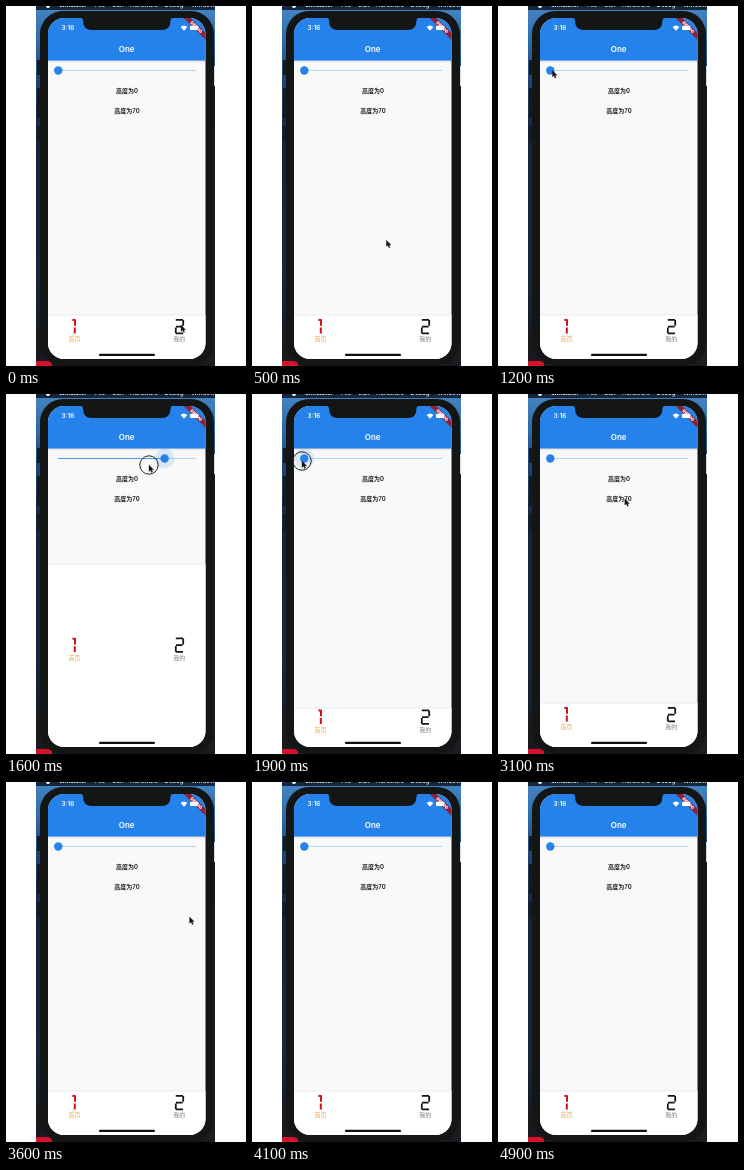
Recreate the animation shown at these times as an HTML page. Size 240x360 px, loop 5000 ms.

```html
<!DOCTYPE html>
<html lang="zh">
<head>
<meta charset="utf-8">
<style>
html, body { margin: 0; width: 100%; height: 100%; overflow: hidden; background: #fff; }
svg { display: block; width: 240px; height: 360px; }
text { font-family: Inter, "Noto Sans CJK SC", "Noto Sans CJK", sans-serif; text-anchor: middle; }
</style>
</head>
<body>
<svg viewBox="0 0 240 360">
  <defs>
    <linearGradient id="desk" x2="0" y2="1">
      <stop offset="0" stop-color="#4585c4"/>
      <stop offset=".1" stop-color="#2f6aa8"/>
      <stop offset=".2" stop-color="#1d4674"/>
      <stop offset=".36" stop-color="#13253c"/>
      <stop offset=".75" stop-color="#14283e"/>
      <stop offset=".92" stop-color="#181a20"/>
    </linearGradient>
    <linearGradient id="shade" x2="0" y2="1">
      <stop offset="0" stop-color="#000" stop-opacity=".14"/>
      <stop offset="1" stop-color="#000" stop-opacity="0"/>
    </linearGradient>
    <clipPath id="view"><path d="M30 0H209V360H30z"/></clipPath>
    <clipPath id="screen"><rect x="42" y="12" width="157.5" height="341" rx="16"/></clipPath>
  </defs>
  <g clip-path="url(#view)">
    <rect x="30" width="179" height="360" fill="url(#desk)"/>
    <path d="M202 60H209V81H202z" fill="#d3dbe2"/>
    <path d="M202 81H209V360H202z" fill="#1b1d20"/>
    <path d="M30 355H46V360H30z" fill="#d5122c"/>
    <path d="M30 0H209V4H30z" fill="#16263c"/>
    <g fill="#fff" font-size="6" font-weight="500">
      <circle cx="42" cy="0" r="2"/>
      <text x="67" y="1.4" font-weight="700">Simulator</text>
      <text x="94" y="1.4">File</text>
      <text x="112" y="1.4">Edit</text>
      <text x="138" y="1.4">Hardware</text>
      <text x="168" y="1.4">Debug</text>
      <text x="197" y="1.4">Window</text>
    </g>
    <path d="M31 54H36V69H31zM31 82H36V112H31zM31 120H36V136H31zM205 80H209V124H205z" fill="#17191c"/>
    <rect x="34" y="5" width="174" height="355" rx="23" fill="#141616"/>

    <g clip-path="url(#screen)">
      <path d="M42 12H200V353H42z" fill="#f9f9f9"/>
      <path d="M42 54H200V57H42z" fill="url(#shade)"/>
      <path d="M42 12H200V54.5H42z" fill="#2482ea"/>
      <text x="62" y="24.3" font-size="6.4" font-weight="600" fill="#fff">3:16</text>
      <text x="120.7" y="45.7" font-size="8" font-weight="600" fill="#fff">One</text>
      <path d="M74.5 12Q77 12 77 14.5Q77 24 86 24H155.5Q164.5 24 164.5 14.5Q164.5 12 167 12z" fill="#141616"/>

      <path d="M52 64.5H190" stroke="#b3d3f5" stroke-width="1"/>
      <path id="track" stroke="#4a97ed" stroke-width="1"/>
      <circle id="halo" cy="64.5" r="10" fill="#2482ea" opacity=".15"/>
      <circle id="thumb" cy="64.5" r="4.2" fill="#2482ea"/>
      <g font-size="6" font-weight="600" fill="#1c1c1c">
        <text x="121" y="87">高度为0</text>
        <text x="121" y="107">高度为70</text>
      </g>

      <g id="bar">
        <path d="M42 0H200V360H42z" fill="#fff"/>
        <path d="M42 0H200" stroke="#e6e6e6" stroke-width=".8"/>
      </g>
      <g id="items" font-size="6" font-weight="500">
        <path d="M66.4 -11.2L69 -10.8V-5.2M68.8 -3.4V2.4" fill="none" stroke="#d01414" stroke-width="2"/>
        <path d="M169.8 -11.2H177M177.2 -11V-5.2M170 -4.4H176.6M169.8 -3.6V2.2M169.8 2.3H177" fill="none" stroke="#161616" stroke-width="1.8"/>
        <text x="68.5" y="10" fill="#f2a340">首页</text>
        <text x="173.3" y="10" fill="#7d7d7d">我的</text>
      </g>
      <rect x="93" y="347.8" width="56" height="2.1" rx="1" fill="#111"/>
      <g transform="translate(190.3 21.2) rotate(45)">
        <path d="M-24 -2.4H24V2.4H-24z" fill="#8f2038"/>
        <text y="1.5" font-size="4.3" font-weight="900" fill="#fff">DEBUG</text>
      </g>
      <path d="M174.6 21Q178 18 181.4 21L178 24.8z" fill="#fff"/>
      <rect x="184" y="19.7" width="8.4" height="4.4" rx="1.2" fill="#fff"/>
    </g>
    <g id="cursor">
      <circle id="ring" r="9.2" fill="none" stroke="#222" stroke-width="1"/>
      <path d="M0 0V6.4L1.5 5.1L2.6 7.6L3.7 7.1L2.6 4.7H4.6z" fill="#111" stroke="#111" stroke-width=".3"/>
    </g>
  </g>
</svg>
<script>
const $ = id => document.getElementById(id);
const LOOP = 5000, STEP = 100;

// Keys are [time, value, ...]; values are interpolated linearly.
function at(keys, t) {
  const i = keys.findIndex(k => k[0] > t);
  if (i < 0) return keys[keys.length - 1].slice(1);
  if (i === 0) return keys[0].slice(1);
  const a = keys[i - 1], b = keys[i], p = (t - a[0]) / (b[0] - a[0]);
  return a.slice(1).map((v, n) => v + (b[n + 1] - v) * p);
}

const slide = [[1200, 0], [1300, .3], [1400, .7], [1500, .9], [1600, .773], [1700, .45], [1800, .15], [1900, 0]];
const pointer = [
  [0, 175, 319], [300, 174, 317], [800, 75, 110], [1100, 54.5, 64.5], [1200, 54.5, 64.5],
  [1300, 100, 67], [1400, 155, 69], [1500, 172, 70], [1600, 143, 71], [1700, 100, 70],
  [1800, 62, 68], [1900, 50, 67], [2000, 56, 69], [2400, 126.8, 92.7], [2700, 126.8, 104.7],
  [3200, 126.8, 104.7], [3800, 212, 150]
];

function draw(now) {
  const t = Math.floor(now % LOOP / STEP) * STEP;
  const [s] = at(slide, t);
  const [x, y] = at(pointer, t);
  const thumbX = 52.3 + 137.5 * s;
  const dragged = t > 1200 && t < 2700;
  const top = dragged ? 314 - 186 * s : 309;
  const pressed = t > 1200 && t < 1950;

  $("track").setAttribute("d", `M52 64.5H${thumbX}`);
  $("thumb").setAttribute("cx", thumbX);
  $("halo").setAttribute("cx", thumbX);
  $("halo").style.display = $("ring").style.display = pressed ? "" : "none";
  $("bar").setAttribute("transform", `translate(0 ${top})`);
  $("items").setAttribute("transform", `translate(0 ${(top + 341) / 2})`);
  $("cursor").setAttribute("transform", `translate(${x} ${y})`);
}

const start = performance.now();
function tick() {
  draw(performance.now() - start);
  requestAnimationFrame(tick);
}
tick();
</script>
</body>
</html>
```
